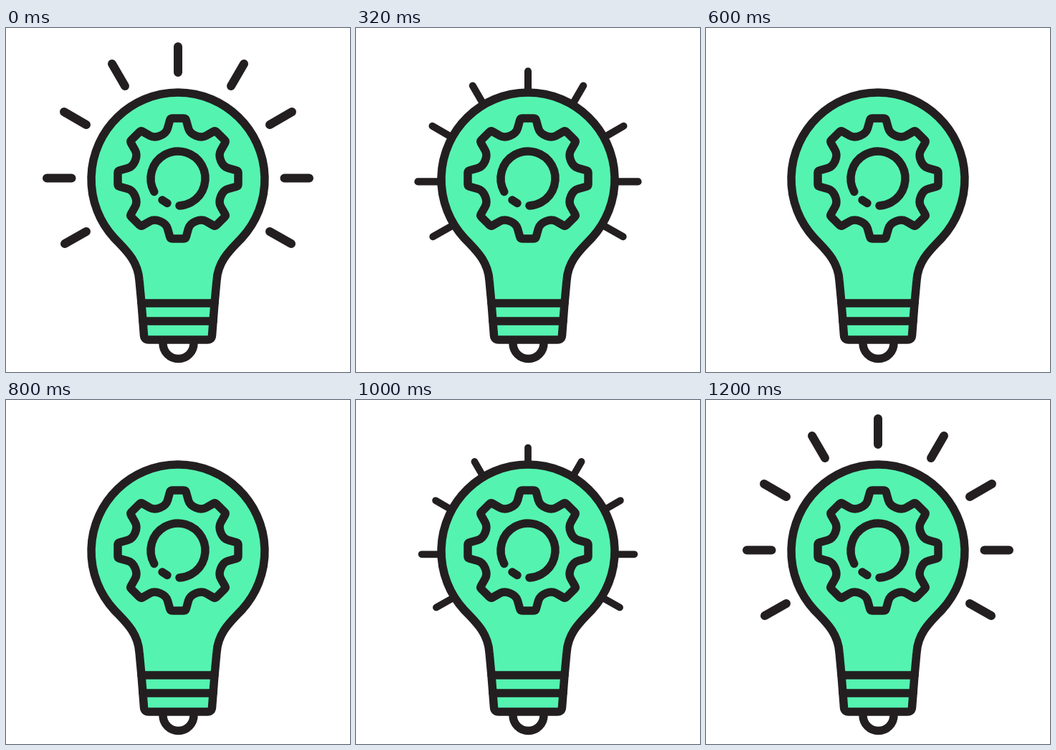
Recreate the animation shown at these times as an HTML page with a canvas. Size 480 by 480 pixels, loop 2680 ms.

```html
<!DOCTYPE html>
<html lang="en">
<head>
<meta charset="utf-8">
<title>Light bulb</title>
<style>
html, body { margin: 0; width: 100%; height: 100%; overflow: hidden; background: #fff; }
canvas { display: block; width: 100%; height: 100%; }
</style>
</head>
<body>
<canvas id="stage" width="480" height="480"></canvas>
<script>
const ctx = document.getElementById('stage').getContext('2d');
const INK = '#231f20', GREEN = '#55f3b0';
const LOOP = 2680, STEP = 40, MID = 240;
const rad = deg => deg * Math.PI / 180;

// Rays on the left half; each is mirrored to the right.
const RAYS = [
  [148, 50, 166, 81],
  [81, 117, 112, 135],
  [57, 209.5, 91.5, 209.5],
  [82, 301, 112, 284]
];

function makeRays() {
  const p = new Path2D('M240 26V62');
  for (const [x1, y1, x2, y2] of RAYS) {
    p.moveTo(x1, y1);
    p.lineTo(x2, y2);
    p.moveTo(480 - x1, y1);
    p.lineTo(480 - x2, y2);
  }
  return p;
}

function makeGear(cx, cy, teeth) {
  const p = new Path2D();
  const turn = 2 * Math.PI / teeth;
  const at = (i, x, y) => {
    const c = Math.cos(i * turn), s = Math.sin(i * turn);
    return [cx + x * c - y * s, cy + x * s + y * c];
  };
  p.moveTo(...at(0, -14.5, -70));
  for (let i = 0; i < teeth; i++) {
    p.lineTo(...at(i, -11.3, -81.5));
    p.quadraticCurveTo(...at(i, -10.6, -84), ...at(i, -8, -84));
    p.lineTo(...at(i, 8, -84));
    p.quadraticCurveTo(...at(i, 10.6, -84), ...at(i, 11.3, -81.5));
    p.lineTo(...at(i, 14.5, -70));
    p.bezierCurveTo(...at(i, 17, -61), ...at(i + 1, -17, -61), ...at(i + 1, -14.5, -70));
  }
  p.closePath();
  return p;
}

const rays = makeRays();
const gear = makeGear(240, 210, 8);
const bulb = new Path2D(
  'M151 293A121 121 0 1 1 329 293C314 309 296 324 294 352' +
  'L291 384L287.5 429Q287 435 281 435H199Q193 435 192.5 429' +
  'L189 384L186 352C184 324 166 309 151 293Z');
const bands = new Path2D('M189 384H291M191 409H289');
const tip = new Path2D('M219 438V440A21.5 21.5 0 0 0 262 440V438');

const ring = new Path2D();
ring.arc(240, 210, 38, rad(151), rad(447));
const dash = new Path2D('M218 240L225 244.5');

// Rays shrink slowly, then grow back faster, both easing at full size.
function rayScale(t) {
  const k = Math.floor(t / STEP);
  if (k <= 2 || k >= 30) return 1;
  return k <= 16
    ? 1 - 0.069 * ((k - 2) / 3) ** 1.22
    : 1 - 0.101 * ((30 - k) / 3) ** 1.23;
}

function draw(t) {
  ctx.fillStyle = '#fff';
  ctx.fillRect(0, 0, 480, 480);
  ctx.strokeStyle = INK;
  ctx.lineCap = ctx.lineJoin = 'round';

  const s = rayScale(t);
  ctx.save();
  ctx.translate(MID, MID);
  ctx.scale(s, s);
  ctx.translate(-MID, -MID);
  ctx.lineWidth = 12;
  ctx.stroke(rays);
  ctx.restore();

  ctx.lineWidth = 11.5;
  ctx.stroke(tip);
  ctx.fillStyle = GREEN;
  ctx.fill(bulb);
  for (const part of [bulb, bands, gear, ring, dash]) ctx.stroke(part);
}

function frame() {
  draw(performance.now() % LOOP);
  requestAnimationFrame(frame);
}
frame();
</script>
</body>
</html>
```
